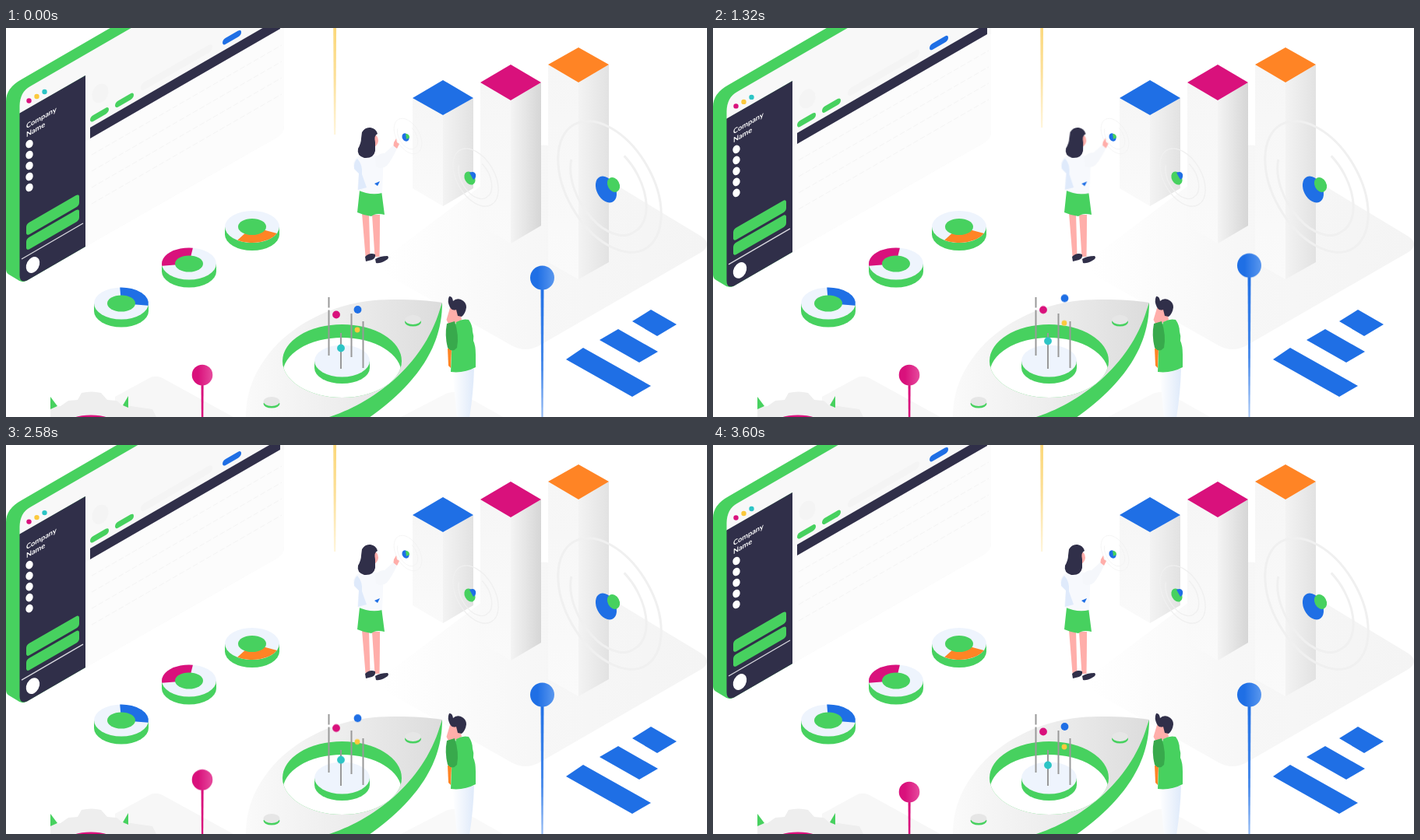
Animation, 900 px wide and 500 px high, one loop 3.62 s. Source, as an HTML page:

```html
<!DOCTYPE html>
<html lang="en">
<head>
<meta charset="utf-8">
<title>Isometric dashboard</title>
<style>
  html, body { margin: 0; width: 100%; height: 100%; overflow: hidden; background: #fff; }
  svg { display: block; width: 900px; height: 500px; }
  .green { fill: #47d15f; }
  .blue { fill: #1f6fe5; }
  .pink { fill: #d9117c; }
  .orange { fill: #ff8425; }
  .yellow { fill: #fbc93d; }
  .cyan { fill: #2cc5c5; }
  .dark { fill: #302f49; }
  .pale { fill: #eef4fd; }
  .skin { fill: #ffaeaa; }
  .white { fill: #fff; }
  .faint { fill: none; stroke: #f0f0f0; stroke-width: 3; }
  .brand { font: 700 9.2px Lato, "Open Sans", sans-serif; fill: #fff; }

  /* sway lasts the whole loop, hop uses its first half */
  .sway, .hop {
    animation: sway 3.62s cubic-bezier(.37, 0, .63, 1) infinite;
  }
  .hop { animation-name: hop; }
  @keyframes sway {
    50% { transform: translateY(var(--y)); }
  }
  @keyframes hop {
    0%, 50%, 100% { transform: none; }
    25% { transform: var(--to); }
  }
  .pin { --to: translateY(-16px); }
  .lean { --to: rotate(2deg); transform-origin: 466px 212px; }
  .reach { --to: translate(2.5px, -2.2px); }
</style>
</head>
<body>
<svg viewBox="0 0 900 500">
  <defs>
    <linearGradient id="side"><stop stop-color="#f4f4f4"/><stop offset="1" stop-color="#d6d6d6"/></linearGradient>
    <linearGradient id="sideSoft"><stop stop-color="#f3f3f3"/><stop offset="1" stop-color="#e2e2e2"/></linearGradient>
    <linearGradient id="face" x2="0" y2="1"><stop stop-color="#f6f6f6"/><stop offset="1" stop-color="#fafafa"/></linearGradient>
    <linearGradient id="floor"><stop stop-color="#fff"/><stop offset=".45" stop-color="#f7f7f7"/><stop offset="1" stop-color="#f4f4f4"/></linearGradient>
    <linearGradient id="drop"><stop stop-color="#fafafa"/><stop offset=".5" stop-color="#ededed"/><stop offset="1" stop-color="#dcdcdc"/></linearGradient>
    <linearGradient id="blueBall"><stop offset=".3" stop-color="#1f6fe5"/><stop offset="1" stop-color="#5a97ee"/></linearGradient>
    <linearGradient id="pinkBall"><stop offset=".3" stop-color="#d9117c"/><stop offset="1" stop-color="#e64b9d"/></linearGradient>
    <linearGradient id="yellowLine" x2="0" y2="1"><stop stop-color="#fbd367"/><stop offset=".6" stop-color="#fce09a"/><stop offset="1" stop-color="#fff6dd"/></linearGradient>
    <linearGradient id="blueLine" x2="0" y2="1"><stop stop-color="#1f6fe5"/><stop offset=".6" stop-color="#4b8ceb"/><stop offset="1" stop-color="#a9c8f6"/></linearGradient>
    <linearGradient id="legs"><stop stop-color="#fff"/><stop offset="1" stop-color="#dfeafa"/></linearGradient>
    <clipPath id="hole"><ellipse cx="431.500" cy="428" rx="76.500" ry="47"/></clipPath>
    <g id="donut">
      <path class="green" d="M-35 0V10A35 20.500 0 0 0 35 10V0Z"/>
      <ellipse class="pale" rx="35" ry="20.500"/>
    </g>
    <ellipse id="hub" class="green" rx="18" ry="10.500"/>
    <g id="rings" class="faint" transform="rotate(-30)">
      <ellipse rx="55" ry="92"/>
      <path d="M-25 -55A39 66 0 0 0 0 66A39 66 0 0 0 36 -25"/>
    </g>
    <g id="bump">
      <ellipse class="green" cy="3" rx="10.500" ry="5.500"/>
      <ellipse rx="10.500" ry="6" fill="#e6e6e6"/>
    </g>
    <ellipse id="item" rx="4.500" ry="5.500" transform="rotate(25)"/>
  </defs>

  <!-- app window -->
  <g class="sway" style="--y:8.3px">
    <path class="green" d="M0 94Q0 77 20 66L151 -10H202L102 62V281L26 325Q20 328 14 323L4 317Q0 315 0 310Z"/>
    <path fill="#f8f8f8" d="M17.500 110V100Q18 82 31 75L178 -10H357V126Q357 135 349 140L102 281V61Z"/>
    <path fill="#fcfcfc" d="M108 142L352 1H357V126Q357 135 349 140L102 281V146Z"/>
    <path fill="none" stroke="#f4f4f4" stroke-dasharray="7 3" d="M110 163L354 22M110 184L354 43M110 205L354 64M110 226L354 85"/>
    <path class="dark" d="M17.500 109.500L102 61V281L27 324.500Q17.500 328 17.500 318Z"/>
    <path class="dark" d="M108 128L352 -13V1L108 142Z"/>
    <circle class="pink" cx="29.500" cy="93.500" r="3.200"/>
    <circle class="yellow" cx="39.500" cy="88" r="3.200"/>
    <circle class="cyan" cx="49.500" cy="82" r="3.200"/>
    <ellipse cx="121" cy="84" rx="10" ry="13" fill="#f4f4f4" transform="rotate(25 121 84)"/>
    <g transform="matrix(1 -.577 0 1 0 0)">
      <rect x="173" y="172" width="92" height="10" rx="5" fill="#f4f4f4"/>
      <rect class="green" x="108" y="176.500" width="24" height="8" rx="4"/>
      <rect class="green" x="140" y="176.500" width="24" height="8" rx="4"/>
      <rect class="blue" x="278" y="175.500" width="24" height="8" rx="4"/>
      <rect class="green" x="26" y="267" width="68" height="15.500" rx="4"/>
      <rect class="green" x="26" y="286" width="68" height="15.500" rx="4"/>
      <text class="brand" x="26" y="144.500">Company</text>
      <text class="brand" x="26" y="155.500">Name</text>
    </g>
    <g class="white">
      <use href="#item" x="0" transform="translate(30 149)"/>
      <use href="#item" transform="translate(30 163)"/>
      <use href="#item" transform="translate(30 177)"/>
      <use href="#item" transform="translate(30 191)"/>
      <use href="#item" transform="translate(30 205)"/>
      <ellipse cx="34.500" cy="304.500" rx="8" ry="11" transform="rotate(28 34.500 304.500)"/>
    </g>
    <path d="M20 297L99 251" stroke="#d9d9e0" stroke-width="1.300"/>
  </g>

  <!-- donuts -->
  <g transform="translate(148 354)">
    <use href="#donut"/>
    <path class="blue" transform="scale(35 20.500)" d="M0 0L-.05 -1A1 1 0 0 1 .99 .14Z"/>
    <use href="#hub"/>
  </g>
  <g transform="translate(235 303)">
    <use href="#donut"/>
    <path class="pink" transform="scale(35 20.500)" d="M0 0L-.99 .14A1 1 0 0 1 .14 -.99Z"/>
    <use href="#hub"/>
  </g>
  <g transform="translate(316 255.500)">
    <use href="#donut"/>
    <path class="orange" transform="scale(35 20.500)" d="M0 0L.91 .42A1 1 0 0 1 -.54 .84Z"/>
    <use href="#hub"/>
  </g>

  <!-- column chart -->
  <path fill="url(#floor)" d="M490 318Q476 305 494 290L672 156Q690 145 708 156L893 268Q907 278 893 288L685 408Q667 418 649 408Z"/>
  <path fill="url(#face)" d="M522 90L561 112V229L522 206Z"/>
  <path fill="url(#sideSoft)" d="M561 112L600 90V206L561 229Z"/>
  <path class="blue" d="M561 67L600 90L561 112L522 90Z"/>
  <path fill="url(#face)" d="M609 70L648 93V277L609 254Z"/>
  <path fill="url(#side)" d="M648 93L687 70V254L648 277Z"/>
  <path class="pink" d="M648 47L687 70L648 93L609 70Z"/>
  <path fill="url(#face)" d="M696 47L735 70V323L696 301Z"/>
  <path fill="url(#sideSoft)" d="M735 70L774 47V301L735 323Z"/>
  <path class="orange" d="M735 25L774 47L735 70L696 47Z"/>
  <use href="#rings" transform="translate(775 204)"/>
  <use href="#rings" transform="translate(603 192) scale(.44)"/>
  <use href="#rings" transform="translate(516 139) scale(.27)" opacity=".7"/>
  <ellipse class="blue" cx="770.500" cy="207.500" rx="12" ry="18" transform="rotate(-28 770.500 207.500)"/>
  <ellipse class="green" cx="780" cy="201.500" rx="7.500" ry="10" transform="rotate(-28 780 201.500)"/>
  <ellipse class="green" cx="595.500" cy="193" rx="6.500" ry="9" transform="rotate(-28 595.500 193)"/>
  <path class="blue" d="M595 186Q601 183 603 188Q604 193 600 195Z"/>
  <ellipse class="blue" cx="513" cy="140.500" rx="4.200" ry="5.500" transform="rotate(-28 513 140.500)"/>
  <path class="green" d="M513 136Q518 136 518 141L514 143Z"/>
  <g class="blue">
    <path d="M741 411L828 460L804 474L719 426Z"/>
    <path d="M786 387L837 416L813 430L762 401Z"/>
    <path d="M828 362L861 381L836 396L804 377Z"/>
  </g>

  <!-- lower left gear -->
  <path fill="#f7f7f7" d="M140 474L182 451Q191 445 201 450L310 510H140Z"/>
  <path fill="#eee" d="M57 488L70 486L80 479L92 478L97 469Q110 466 122 469L130 478L142 479L150 486L160 486L188 490L193 500H57Z"/>
  <path class="green" d="M57 474L66 486L57 490Z"/>
  <path class="green" d="M157 473L150 485L157 488Z"/>
  <ellipse class="pink" cx="109" cy="508" rx="30" ry="10.500"/>

  <!-- pins -->
  <g class="hop pin">
    <path fill="url(#yellowLine)" d="M420 -40H424.300L423.300 137H421Z"/>
  </g>
  <g class="hop pin" style="animation-delay:-3.14s">
    <path fill="url(#blueLine)" d="M686.500 330H690.500L689.500 516H687.500Z"/>
    <circle fill="url(#blueBall)" cx="688.500" cy="321" r="15.500"/>
  </g>
  <g class="hop pin" style="animation-delay:-1.87s">
    <path class="pink" d="M250.500 450H253.700L253.200 520H251Z"/>
    <circle fill="url(#pinkBall)" cx="252" cy="446" r="13.300"/>
  </g>

  <!-- drop with dot chart -->
  <path class="green" d="M560 353C560 400 538 450 466 501H400Z"/>
  <path fill="url(#drop)" d="M560 353C535 349 500 348 473 350C415 355 365 384 338 418C316 446 308 472 308 501H412C470 483 535 435 557 362Z"/>
  <g clip-path="url(#hole)">
    <rect class="green" x="350" y="375" width="165" height="105"/>
    <ellipse class="white" cx="431.500" cy="445" rx="76.500" ry="47"/>
  </g>
  <path class="green" d="M396 428V437A35.500 20 0 0 0 467 437V428Z"/>
  <ellipse class="pale" cx="431.500" cy="428" rx="35.500" ry="20.500"/>
  <use href="#bump" x="522.500" y="375"/>
  <use href="#bump" x="341" y="480"/>
  <path stroke="#999" stroke-width="2" d="M414.500 346V359.500M414.500 362.500V421M443.500 367V423M458.500 377V437M430 392V438"/>
  <circle class="sway blue" style="--y:-17.5px" cx="451.500" cy="362" r="4.900"/>
  <circle class="sway pink" style="--y:-7.5px" cx="424" cy="368.500" r="4.900"/>
  <circle class="sway yellow" style="--y:-10.5px" cx="451" cy="388" r="3.400"/>
  <circle class="sway cyan" style="--y:-11px" cx="430" cy="411.500" r="4.900"/>

  <!-- man -->
  <path fill="#f9f9f9" d="M505 501L565 470Q575 466 585 470L640 501Z"/>
  <path fill="url(#legs)" d="M573 440L601 438Q600 470 595 501H579Z"/>
  <path class="orange" d="M567 412H572L571 437L568 434Z"/>
  <path class="skin" d="M570 360L582 358L585 375L575 380L569 382L565.500 375Z"/>
  <path class="green" d="M578 378Q586 373 594 375Q599 382 599 390Q601 396 600 402Q603 408 603 420V436Q588 444 571 442L573 395Z"/>
  <path fill="#38a94c" d="M566 380L576 377Q582 395 579 411Q573 418 567 411Q563 395 566 380Z"/>
  <path class="dark" d="M569 345Q573 344 574 351Q578 347 584 349Q591 352 591 359Q590 367 585 371L580 370L578 362Q573 364 570 359Q566 351 569 345Z"/>

  <!-- woman -->
  <path class="skin" d="M457 238H466L467.500 293H461.500ZM470 240H480Q480 265 479.500 294H473.500Z"/>
  <path class="dark" d="M461 294Q467 288 474 291Q475 296 470 298L462 300ZM474 297Q480 293 490 293Q493 296 487 299Q480 303 475 302Z"/>
  <path class="green" d="M454 209H482L486 240Q475 237 469 242Q460 241 451 237Z"/>
  <g class="hop lean">
    <path fill="#f7f9fd" d="M453 165Q466 161 477 164Q486 172 484 186L483 212Q468 216 451 208L453 186Q446 182 446 174Q448 167 453 165Z"/>
    <path fill="#dfeafb" d="M451 168Q458 175 457 188L463 205L452 208L453 187L447 181Q446 172 451 168Z"/>
    <path class="blue" d="M473 200L480 197L477 203Z"/>
    <path class="skin" d="M470 136Q478 137 478 145Q477 152 471 153Z"/>
    <path class="dark" d="M457 134Q461 127 468 128Q475 129 477 136Q472 138 474 147Q474 153 474 158Q472 168 460 167Q450 164 452 155Q456 148 456 142Z"/>
    <g class="hop reach">
      <path class="skin" d="M497 154L498 147L501 142L502 147L505 149L502 155Z"/>
      <path fill="#f5f7fb" d="M474 167Q480 160 486 161L497 151L502 155Q495 170 489 177Q481 183 475 178Z"/>
    </g>
  </g>
</svg>
</body>
</html>
```
